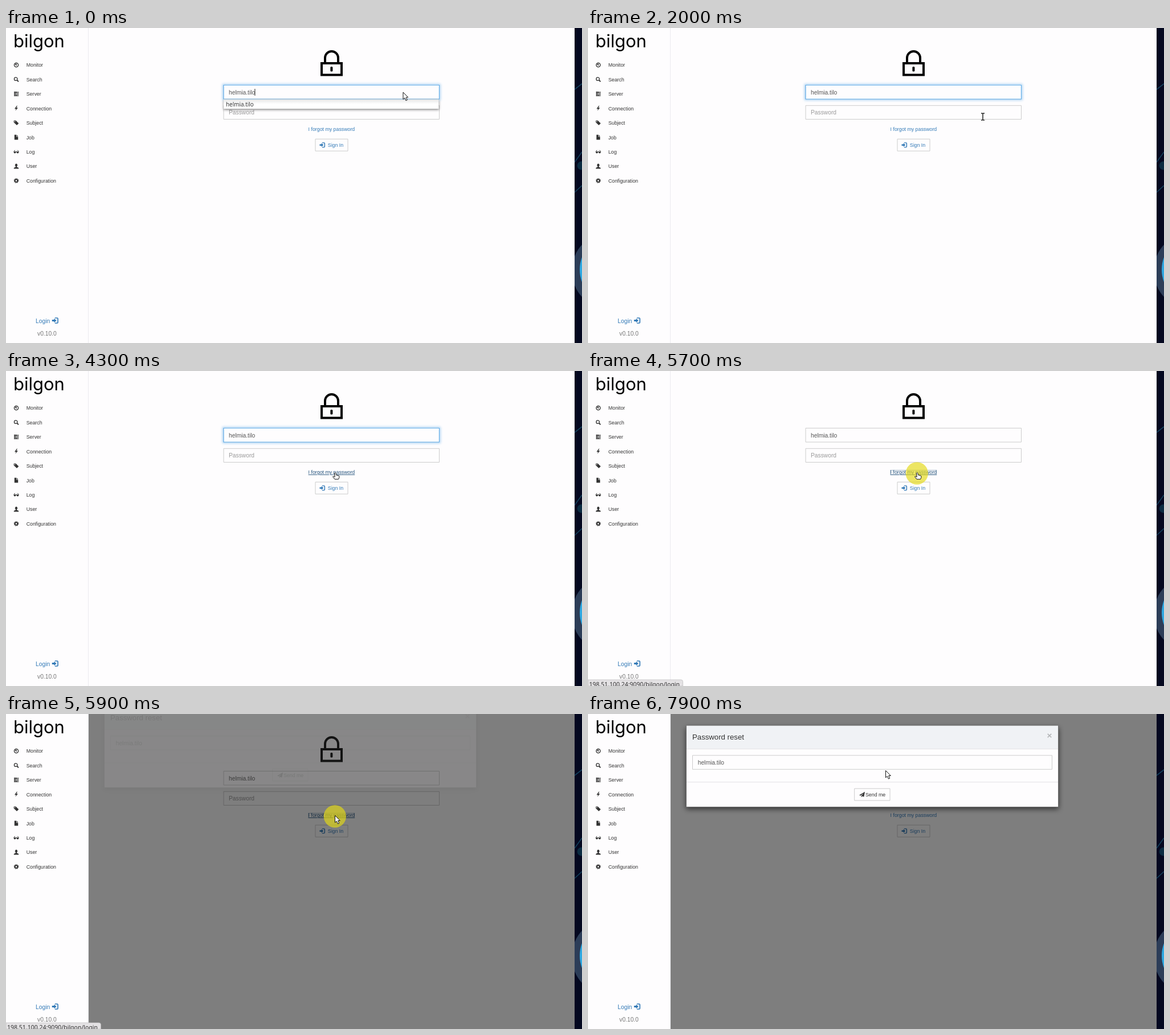
These frames come from a looping animation (1011x554 px, 8000 ms). An HTML page:

```html
<!DOCTYPE html>
<html lang="en">
<head>
<meta charset="utf-8">
<title>Password reset</title>
<style>
  html, body { margin: 0; width: 100%; height: 100%; overflow: hidden; background: #fefdfe; }
  svg { display: block; font: 8.8px "Liberation Sans", Arial, sans-serif; fill: #333; }
  .mid { font-size: 10.27px; }
  .blue { fill: #337ab7; }
  .grey { fill: #555; }
  .box { fill: #fefdfe; stroke: #ccc; }
  .system { font-family: "Noto Sans", sans-serif; fill: #333; }
  .line { fill: none; stroke: #333; stroke-width: 1.3; }
  .pointer { fill: #fff; stroke: #111; stroke-linejoin: round; }
</style>
</head>
<body>
<svg width="1011" height="554" viewBox="0 0 1011 554">
  <defs>
    <g id="enter">
      <path d="M4.5 .9H8.2Q9.3 .9 9.3 2V8Q9.3 9.1 8.2 9.1H4.5" fill="none" stroke="#337ab7" stroke-width="1.5"/>
      <path class="blue" d="M0 3.7H3.3V1.5L7 5 3.3 8.5V6.3H0z"/>
    </g>
    <linearGradient id="fall" x2="0" y2="1">
      <stop stop-color="#e6e6e6"/><stop offset=".5" stop-color="#fff"/>
    </linearGradient>
    <filter id="blur" x="-10%" y="-50%" width="120%" height="200%"><feGaussianBlur stdDeviation="2.2"/></filter>
    <filter id="soft" x="-10%" y="-30%" width="120%" height="160%"><feGaussianBlur stdDeviation="5"/></filter>
    <clipPath id="edge"><path d="M998 0H1011V554H998z"/></clipPath>
  </defs>

  <path d="M0 0H998V554H0z" fill="#fefdfe"/>
  <path d="M144.5 0V554" stroke="#ebebf0"/>

  <!-- sign-in form -->
  <g fill="none" stroke="#000" stroke-width="4">
    <path d="M554 62H589V82.5H554z"/>
    <path d="M560 61V52.5a11.5 11.5 0 0 1 23 0V61"/>
  </g>
  <rect x="569.4" y="68" width="4" height="8.5" rx="1.5" fill="#000"/>
  <path class="box" d="M382 100.5H760.5V125H382z"/>
  <g id="focus">
    <path d="M382 100.5H760.5V125H382z" fill="none" stroke="#66afe9" stroke-width="4" opacity=".6" filter="url(#blur)"/>
    <path d="M382 100.5H760.5V125H382z" fill="#fefdfe" stroke="#66afe9" stroke-width="1.2"/>
  </g>
  <text class="mid grey" x="391" y="116.6">helmia.tilo</text>
  <path id="caret" d="M436.9 107V119" stroke="#222"/>
  <path class="box" d="M382 136.3H760.5V160.5H382z"/>
  <text class="mid" x="391" y="152" style="fill:#999">Password</text>
  <text id="link" x="530.6" y="181">I forgot my password</text>
  <path id="outline" d="M531 174.5H611.5V182.5H531z" fill="none" stroke="#23527c" stroke-dasharray="1 1" stroke-width=".8"/>
  <path class="box" d="M543 195.3H600V216.3H543z"/>
  <use href="#enter" transform="translate(550.5 201)scale(.95)"/>
  <text class="blue" x="564.8" y="209">Sign In</text>
  <g id="list">
    <path d="M382 127H760V144H382z" fill="#000" opacity=".45" filter="url(#blur)"/>
    <path d="M382 125.5H759.5V142H382z" fill="url(#fall)"/>
    <text class="system" x="386" y="137.8" font-size="9.9">helmia.tilo</text>
  </g>

  <path id="shade" d="M145 0H998V554H145z" fill="#000"/>

  <!-- reset dialog -->
  <g id="dialog">
    <path d="M172 4H826V147H172z" fill="#000" opacity=".6" filter="url(#soft)"/>
    <path d="M172.5 0H825.5V143.3H172.5z" fill="#fefdfe" stroke="#666" stroke-width=".8"/>
    <path d="M173 .4H825V41H173z" fill="#f0f2f5"/>
    <path d="M173 41.3H825M173 99.5H825" stroke="#e2e2e4"/>
    <text x="183" y="25" font-size="13.2">Password reset</text>
    <text x="805.4" y="23" font-size="15.4" font-weight="bold" style="fill:#b4b6b8">×</text>
    <path class="box" d="M183.5 52.5H814.5V77H183.5z"/>
    <text class="mid grey" x="192.7" y="68.7">helmia.tilo</text>
    <path class="box" d="M467.7 110.8H530V131.8H467.7z"/>
    <path d="M476 122.5L486 116.5 484.3 125.5 481.3 124.3 479.7 126.3V123.6L484 119 478.5 123.3z"/>
    <text x="487" y="124.8">Send me</text>
  </g>

  <!-- sidebar -->
  <text x="13" y="34" font-size="31" style="font-family:Inter,sans-serif;fill:#000">bilgon</text>
  <g id="menu"></g>
  <text class="mid blue" x="52" y="518.6">Login</text>
  <use href="#enter" transform="translate(80.8 509)scale(1.1)"/>
  <text class="mid" x="55" y="540.6" style="fill:#777">v0.10.0</text>

  <!-- desktop behind the window -->
  <g clip-path="url(#edge)">
    <path d="M998 0H1011V554H998z" fill="#040820"/>
    <path d="M998 108L1011 98M998 236L1011 218M998 289L1011 277" stroke="#12405c" stroke-width="1.6"/>
    <circle cx="1010" cy="242" r="7.5" fill="#0b2c42"/>
    <circle cx="1061" cy="427" r="68" fill="#2c3d58"/>
    <circle cx="1069" cy="425" r="62" fill="#2fa9e2"/>
  </g>

  <g id="status">
    <path d="M0 543H163Q166.5 543 166.5 546.5V554H0z" fill="#e4e2e4" stroke="#bbb" stroke-width=".7"/>
    <text class="system" x="2" y="554.6" font-size="10.5">198.51.100.24:9090/bilgon/login</text>
  </g>

  <circle id="click" cx="577.3" cy="180" r="19.7" fill="#e4da14" opacity=".66"/>
  <g id="cursor">
    <path id="arrow" class="pointer" d="M0 0V12.4L2.9 9.9 4.9 14.6 7.2 13.6 5.2 9H8.8z"/>
    <g id="beam">
      <path d="M-3 -6H3M0 -6V6M-3 6H3" stroke="#fff" stroke-width="3"/>
      <path d="M-3 -6H-1L0 -5 1 -6H3M0 -5V5M-3 6H-1L0 5 1 6H3" fill="none" stroke="#222" stroke-width="1.5"/>
    </g>
    <path id="hand" class="pointer" d="M-1 1Q0 -.8 1.2 1L2 4.4 5.6 5 7.3 6.4V9L6 11.8H-.5L-3.8 7.6Q-3.6 6.2 -2.2 6.7L-.3 8z"/>
  </g>
</svg>
<script>
const el = id => document.getElementById(id);
const clamp = v => Math.min(1, Math.max(0, v));
const ramp = (t, from, to) => clamp((t - from) / (to - from));
const show = (id, v) => el(id).setAttribute("opacity", +v);

const icons = [
  ["Monitor", '<circle class="line" r="3.6"/><path class="line" d="M-2 -1.5L0 .3V-2.6" stroke-width="1"/>'],
  ["Search", '<circle class="line" cx="-.8" cy="-.8" r="2.8"/><path class="line" d="M1.3 1.3L4 4" style="stroke-width:1.9"/>'],
  ["Server", '<path d="M-4 -4H4.2V-1.9H-4zM-4 -1.1H4.2V1H-4zM-4 1.8H4.2V3.9H-4z"/><path d="M1 -3H3.5M-1 0H3.5M2 2.8H3.5" stroke="#fff" stroke-width=".7"/>'],
  ["Connection", '<path d="M.8 -4.5L-3 .8H-.3L-1.6 4.5 3 -1.2H.2L2 -4.5z"/>'],
  ["Subject", '<path d="M-4.3 -4H-.7L4.3 1 1 4.3 -4.3 -.8z"/><circle cx="-2.5" cy="-2.2" r=".8" fill="#fff"/>'],
  ["Job", '<path d="M-3.2 -4.4H.2V-1H3.2V4.3H-3.2zM.9 -4.4L3.2 -1.8H.9z"/>'],
  ["Log", '<path d="M-4.5 -.5H-.5V1Q-1 2.8 -2.5 2.8T-4.5 .8zM.5 -.5H4.5V.8Q4 2.8 2.5 2.8T.5 1z"/><path class="line" d="M-4 -.3L-3 -2.3H-2M4 -.3L3 -2.3H2M-1 0H1" style="stroke-width:.9"/>'],
  ["User", '<ellipse cy="-2" rx="2.1" ry="2.6"/><path d="M-1 0H1V1.2L4.2 2.8V4.3H-4.2V2.8L-1 1.2z"/>'],
  ["Configuration", '<circle class="line" r="2.3" style="stroke-width:1.9"/><circle r="3.6" fill="none" stroke="#333" stroke-width="1.5" stroke-dasharray="1.45 1.377"/>']
];
el("menu").innerHTML = icons.map(([name, art], i) => {
  const y = 65 + 25.45 * i;
  return `<g transform="translate(18 ${y})">${art}</g><text x="35.7" y="${y + 3.3}">${name}</text>`;
}).join("");

// pointer legs: start time, end time, x, y reached
const legs = [
  [100, 400, 697, 131],
  [1500, 1900, 693, 156],
  [3500, 4300, 577.5, 178.5],
  [6600, 7400, 568, 146],
  [7600, 7900, 522.5, 99.5]
];
function pointerAt(t) {
  let x = 697, y = 113;
  for (const [from, to, nx, ny] of legs) {
    const p = ramp(t, from, to), e = p * p * (3 - 2 * p);
    x += (nx - x) * e;
    y += (ny - y) * e;
  }
  return [x, y];
}

function draw(now) {
  const t = now % 8000;
  const [x, y] = pointerAt(t);
  const modal = t >= 5740;
  const overLink = x > 531 && x < 612 && y > 172 && y < 185 && t < 6600;
  const hand = overLink && !modal;
  const beam = !modal && t >= 1500 && y > 136 && y < 161;

  el("cursor").setAttribute("transform", `translate(${x} ${y})`);
  show("hand", hand);
  show("beam", beam);
  show("arrow", !hand && !beam);

  show("list", 1 - ramp(t, 600, 800));
  show("caret", t < 5500 && Math.floor((t + 400) / 800) % 2 === 0);
  show("focus", 1 - ramp(t, 5500, 5650));
  el("link").style.fill = overLink ? "#23527c" : "#337ab7";
  el("link").style.textDecoration = overLink ? "underline" : "none";
  show("outline", t >= 5500 && t < 6200);
  show("status", ramp(t, 4400, 4600) * (1 - ramp(t, 6000, 6250)));
  show("click", t >= 5500 && t < 6400 ? .66 : 0);

  show("shade", ramp(t, 5740, 5890) / 2);
  const drop = 36 * (1 - ramp(t, 5890, 6210)) ** 1.55;
  el("dialog").setAttribute("transform", `translate(0 ${20.3 - drop})`);
  show("dialog", ramp(t, 5890, 6040));
}

const start = performance.now();
function loop() {
  draw(performance.now() - start);
  requestAnimationFrame(loop);
}
loop();
</script>
</body>
</html>
```
